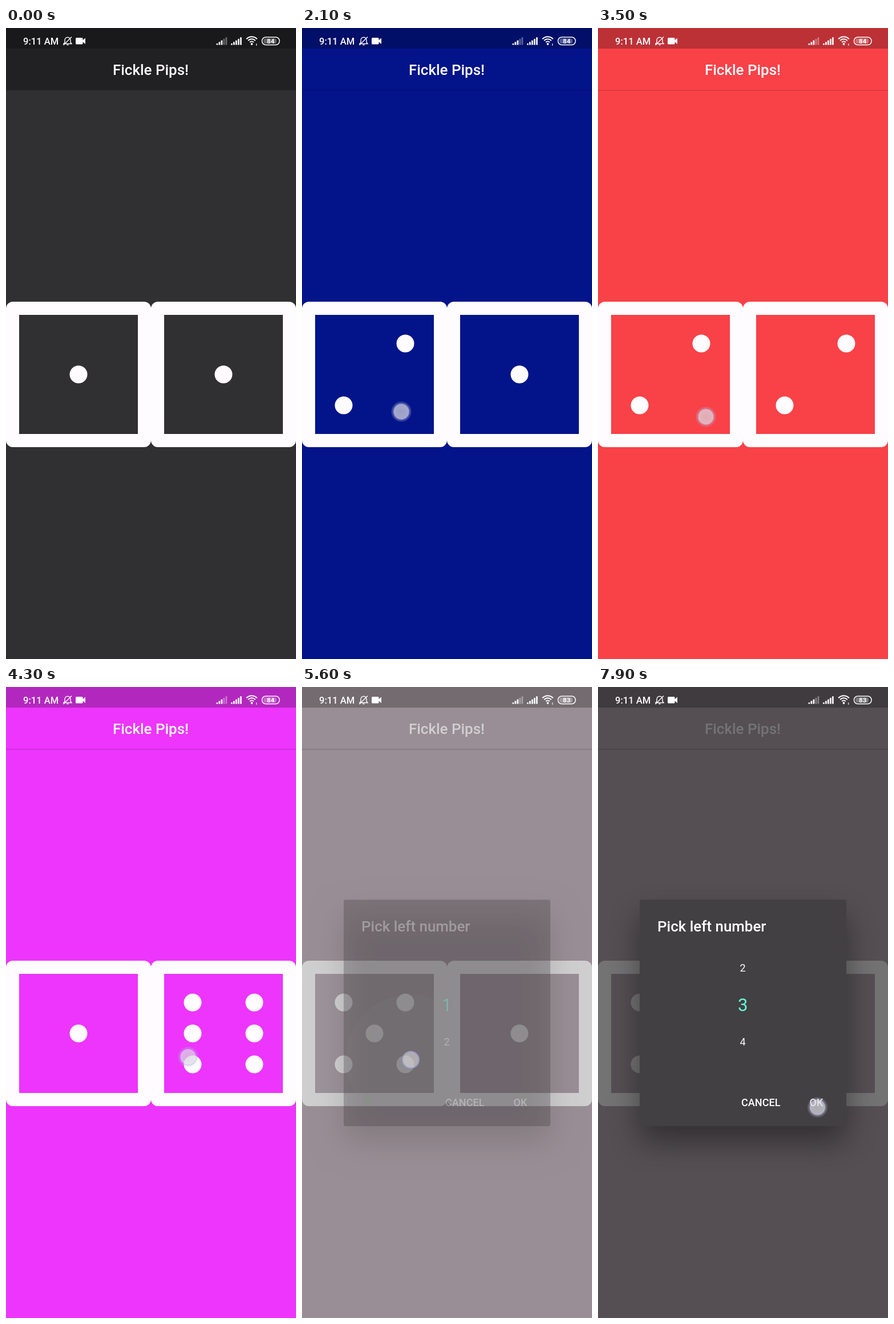
Animation, 508 px wide and 1102 px high, one loop 8 s. Source, as an HTML page with a canvas:

```html
<!DOCTYPE html>
<html lang="en">
<head>
<meta charset="utf-8">
<title>Dice roller</title>
<style>
  html, body { margin: 0; width: 100%; height: 100%; overflow: hidden; background: #302f31; }
  canvas { display: block; }
</style>
</head>
<body>
<canvas id="stage" width="508" height="1102"></canvas>
<script>
const ctx = document.getElementById('stage').getContext('2d');
const LOOP = 8000, STEP = 100;
const WHITE = '#fefcfe';
const DIE = 254, DIE_TOP = 478, ROW = 64.6;

// Each tap rolls both dice and picks a new background.
const START = { color: '#302f31', bar: '#212022', dice: [1, 1] };
const TAPS = [
  { at: 1200, x: 172, y: 668, color: '#03148a', dice: [2, 1] },
  { at: 2100, x: 174, y: 670, color: '#4f8a8b', dice: [4, 3] },
  { at: 2900, x: 184, y: 676, color: '#f94148', dice: [2, 2] },
  { at: 3500, x: 189, y: 679, color: '#ed35fd', dice: [1, 6] },
  { at: 4300, x: 319, y: 646, color: '#baadb6', dice: [5, 1] },
];
const HOLD = { at: 5000, opens: 5500, lifted: 6100, x: 190.5, y: 651 };
const DRAG = { at: 6600, lifted: 6800, settled: 7500, x: 260.5, y: 608 };
const OK_TAP = { at: 7900, x: 384.5, y: 734 };

const clamp = v => Math.min(1, Math.max(0, v));
const progress = (t, from, to) => clamp((t - from) / (to - from));
const white = a => `rgba(255,255,255,${a})`;
const black = a => `rgba(0,0,0,${a})`;

function rect(x, y, w, h, fill) {
  ctx.fillStyle = fill;
  ctx.fillRect(x, y, w, h);
}

function disc(x, y, r, fill) {
  ctx.beginPath();
  ctx.arc(x, y, r, 0, 2 * Math.PI);
  ctx.fillStyle = fill;
  ctx.fill();
}

function text(str, x, y, size, { weight = 400, align = 'left', color = WHITE } = {}) {
  ctx.font = `${weight} ${size}px Roboto, sans-serif`;
  ctx.textAlign = align;
  ctx.fillStyle = color;
  ctx.fillText(str, x, y);
}

function clipped(x, y, w, h, draw) {
  ctx.save();
  ctx.beginPath();
  ctx.rect(x, y, w, h);
  ctx.clip();
  draw();
  ctx.restore();
}

function drawDie(left, value) {
  ctx.beginPath();
  ctx.roundRect(left, DIE_TOP, DIE, DIE, 12);
  ctx.rect(left + 23, DIE_TOP + 23, 208, 208);
  ctx.fillStyle = WHITE;
  ctx.fill('evenodd');
  const pip = (dx, dy) => disc(left + 127 + dx * 54, DIE_TOP + 127 + dy * 54, 15.5, WHITE);
  const pair = (dx, dy) => { pip(dx, dy); pip(-dx, -dy); };
  if (value % 2) pip(0, 0);
  if (value > 1) pair(1, -1);
  if (value > 3) pair(1, 1);
  if (value > 5) pair(1, 0);
}

function drawInk({ x, y }, radius, alpha) {
  if (alpha <= 0) return;
  const left = x < DIE ? 0 : DIE;
  clipped(left, DIE_TOP, DIE, DIE, () => {
    rect(left, DIE_TOP, DIE, DIE, white(.16 * alpha));
    disc(x, y, radius, white(.15 * alpha));
  });
}

function drawPress(x, y) {
  const glow = ctx.createRadialGradient(x, y, 0, x, y, 18.5);
  glow.addColorStop(0, 'rgba(214,212,220,.72)');
  glow.addColorStop(.7, 'rgba(222,220,230,.74)');
  glow.addColorStop(.76, 'rgba(170,170,210,.5)');
  glow.addColorStop(1, 'rgba(190,190,225,0)');
  disc(x, y, 18.5, glow);
}

function drawRing(x, y, alpha = 1) {
  ctx.globalAlpha = alpha;
  disc(x, y, 14.5, 'rgba(240,236,242,.5)');
  ctx.strokeStyle = 'rgba(150,158,205,.8)';
  ctx.lineWidth = 2;
  ctx.stroke();
  ctx.globalAlpha = 1;
}

function drawTouches(t) {
  for (const tap of [...TAPS, OK_TAP]) {
    const age = t - tap.at;
    if (age >= 0 && age < 100) drawPress(tap.x, tap.y);
    else if (age >= 100 && age < 200) drawRing(tap.x, tap.y, .7);
  }
  if (t >= HOLD.at && t < HOLD.lifted) (t < HOLD.at + 200 ? drawPress : drawRing)(HOLD.x, HOLD.y);
  if (t >= DRAG.at && t < DRAG.lifted) drawPress(DRAG.x, DRAG.y - scrollAt(t));
}

function scrollAt(t) {
  if (t < DRAG.at) return 0;
  const rest = 1 - progress(t, DRAG.at, DRAG.settled);
  return 8 + (2 * ROW - 8) * (1 - rest ** 3);
}

function drawDialog(t) {
  ctx.save();
  ctx.shadowColor = black(.42);
  ctx.shadowBlur = 54;
  ctx.shadowOffsetY = 27;
  ctx.beginPath();
  ctx.roundRect(73, 371.5, 362, 395.5, 3);
  ctx.fillStyle = '#424042';
  ctx.fill();
  ctx.restore();
  text('Pick left number', 104, 427, 25.9, { weight: 500 });
  text('CANCEL', 251, 731.5, 18.1, { weight: 500 });
  text('OK', 370.5, 731.5, 18.1, { weight: 500 });

  const scroll = scrollAt(t), selected = Math.round(scroll / ROW) + 1;
  clipped(73, 458, 362, 3 * ROW, () => {
    for (let n = 1; n <= 6; n++) {
      const y = 555 + (n - 1) * ROW - scroll;
      if (n === selected) text(n, 253.7, y + 11, 31, { align: 'center', color: '#64ffda' });
      else text(n, 253.7, y + 6.5, 18.1, { align: 'center' });
    }
  });
}

function drawSignal(x, lit) {
  for (let i = 0; i < 5; i++) {
    const h = 2.5 + i * 2.7;
    rect(x + i * 4, 29.5 - h, 2.8, h, white(i < lit ? .95 : .35));
  }
}

function drawStatus(t) {
  text('9:11 AM', 30, 28.7, 16.6, { weight: 500 });

  ctx.strokeStyle = ctx.fillStyle = WHITE;
  ctx.lineWidth = 1.4;
  ctx.stroke(new Path2D('M101 27.5H115L113 25V21.5C113 14.5 103 14.5 103 21.5V25ZM106.5 29.5H109.5M100.5 30L115 15.5'));

  ctx.beginPath();
  ctx.roundRect(122, 17, 12.5, 11.5, 1.5);
  ctx.fill();
  ctx.fill(new Path2D('M134 21.5L139 17.5V28L134 24Z'));

  drawSignal(368.5, 3);
  drawSignal(394, 5);

  ctx.lineWidth = 2.1;
  for (const r of [4.5, 8.7, 12.8]) {
    ctx.beginPath();
    ctx.arc(430.5, 28, r, -Math.PI * .76, -Math.PI * .24);
    ctx.stroke();
  }
  disc(430.5, 28, 1.9, WHITE);
  rect(438, 27, 1.4, 4, white(.75));

  ctx.beginPath();
  ctx.roundRect(448.5, 16, 30.5, 13.5, 6.5);
  ctx.lineWidth = 1.5;
  ctx.stroke();
  ctx.beginPath();
  ctx.roundRect(451, 18.3, 23, 9, 3.5);
  ctx.fillStyle = white(.32);
  ctx.fill();
  text(t < 4500 ? '84' : '83', 463.7, 27, 11.5, { weight: 700, align: 'center' });
}

function draw(t) {
  const state = TAPS.filter(tap => t >= tap.at + 100).pop() || START;
  rect(0, 0, 508, 1102, state.color);
  if (state.bar) rect(0, 0, 508, 108, state.bar);
  rect(0, 108, 508, 1.5, black(.15));
  rect(0, 0, 508, 36, black(.25));
  text('Fickle Pips!', 253.5, 82, 25.9, { weight: 500, align: 'center' });

  for (const tap of TAPS) {
    const age = t - tap.at;
    if (age >= 100 && age < 300) drawInk(tap, age * .9, 1.25 - age / 250);
  }
  if (t > HOLD.at) {
    drawInk(HOLD, (t - HOLD.at) * .19, progress(t, 5000, 5200) * (1 - progress(t, 5500, 5700)));
  }
  state.dice.forEach((value, i) => drawDie(i * DIE, value));

  const shown = progress(t, HOLD.opens, 5800);
  if (shown) {
    rect(0, 0, 508, 1102, black(.54 * shown));
    ctx.globalAlpha = shown;
    drawDialog(t);
    ctx.globalAlpha = 1;
  }
  drawStatus(t);
  drawTouches(t);
}

const began = performance.now();
function tick() {
  const t = (performance.now() - began) % LOOP;
  draw(Math.floor(t / STEP) * STEP);
  requestAnimationFrame(tick);
}
tick();
</script>
</body>
</html>
```
